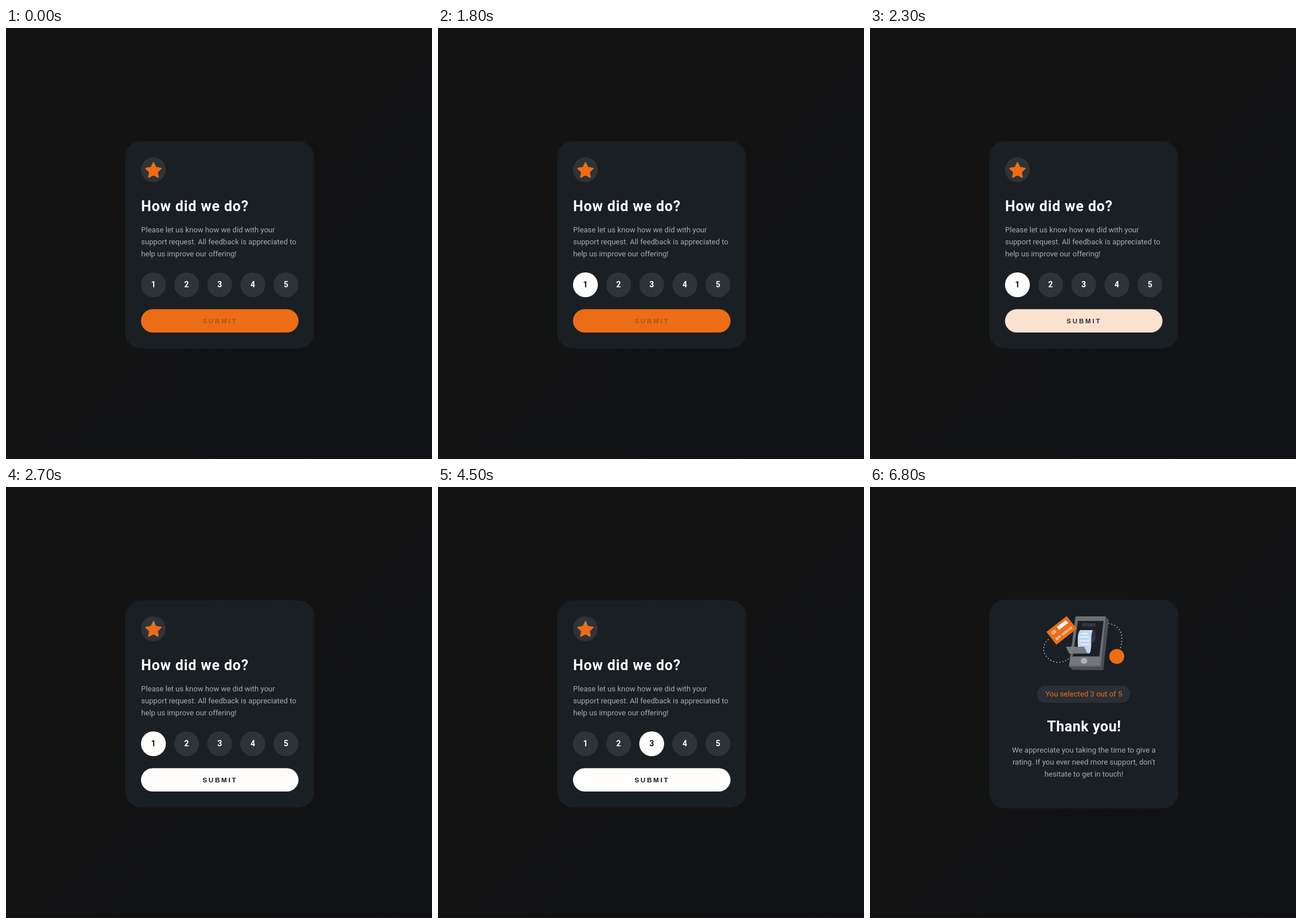
Recreate the animation shown at these times as an HTML page. Size 744 by 753 pixels, loop 9000 ms.

```html
<!DOCTYPE html>
<html lang="en">
<head>
<meta charset="utf-8">
<title>Rating card</title>
<style>
  html, body { margin: 0; height: 100%; overflow: hidden; background: #121315; }
  svg { display: block; width: 100vw; height: 100vh; }
  text { font: 13.1px Roboto, sans-serif; fill: #a8abae; }
  .title { font-size: 25px; font-weight: 700; fill: #fff; }
  .mid, .rate text { text-anchor: middle; }
  .mid { font-size: 13.2px; }
  .rate text { font-size: 14px; font-weight: 700; }
  #label { font: bold 11.7px "Liberation Sans", Arial, sans-serif; letter-spacing: 2.7px; fill: #111417; }
  .dots { fill: none; stroke: #c9cbcd; stroke-width: 1.2; stroke-dasharray: 2.2 3.2; }
</style>
</head>
<body>
<svg viewBox="0 0 744 753">
  <defs>
    <linearGradient id="bg" x2="1" y2="1">
      <stop offset=".35" stop-color="#131313"/>
      <stop offset="1" stop-color="#101216"/>
    </linearGradient>
  </defs>
  <rect width="744" height="753" fill="url(#bg)"/>

  <g id="form">
    <rect x="208" y="198" width="330.5" height="362" rx="28" fill="#1a1f24"/>
    <circle cx="257.5" cy="247.7" r="21.7" fill="#2e3338"/>
    <polygon id="star" fill="#ed6d17" stroke="#ed6d17" stroke-width="2.6" stroke-linejoin="round"/>
    <text class="title" x="236" y="320" letter-spacing=".85">How did we do?</text>
    <text x="236" y="357">Please let us know how we did with your</text>
    <text x="236" y="378">support request. All feedback is appreciated to</text>
    <text x="236" y="399">help us improve our offering!</text>
    <g id="rates"></g>
    <rect id="button" x="235.8" y="491.3" width="275" height="40.8" rx="20.4"/>
    <text id="label" x="343.3" y="515.9">SUBMIT</text>
  </g>

  <g id="thanks">
    <rect x="208" y="197" width="330.5" height="364.5" rx="28" fill="#1a1f25"/>
    <path class="dots" d="M416 238.5C432 240 440 251 440 265Q440 274 437 282"/>
    <path class="dots" d="M312 266C301 274 301 288 309 297C319 309 338 310 350 297"/>
    <!-- terminal -->
    <path fill="#4b4f55" d="M411 226L417 232L407.5 320L354 319.5L347.5 313.5Z"/>
    <path fill="#6c7076" d="M359 226H411.5L403 313.5H347.5Z"/>
    <path fill="#1c2026" d="M363 234H408L400.5 296H354Z"/>
    <path fill="#74777c" d="M350 296.5H402L400.5 311H348.5Z"/>
    <path fill="#34383e" d="M371 238H394.5L393.5 243.5H370Z"/>
    <path fill="#30343a" d="M386 250H391L394 255L393 271H384Z"/>
    <ellipse cx="373.7" cy="303.7" rx="5.7" ry="5" fill="#b0b2b5"/>
    <!-- receipt -->
    <path fill="#c2d7f1" d="M367 250H389C384 260 389 279 384 290Q379 292 361 290C366 280 359 259 367 250Z"/>
    <path stroke="#f5f8fc" stroke-width="1.3" d="M368 256H381M366 262H382M366 268.5H383M367 275H383"/>
    <path fill="#777a7f" d="M342 279H374L380 291H348Z"/>
    <!-- payment card -->
    <g transform="translate(334.5 250.5) rotate(-38)">
      <rect x="-22.5" y="-14.2" width="45" height="28.4" fill="#ed6d17"/>
      <rect x="-3" y="-9.7" width="20" height="6.5" fill="#fff"/>
      <g fill="#f3ab7b">
        <rect x="-17.5" y="-9" width="9.5" height="6.5" rx="3"/>
        <rect x="-18" y="4" width="11" height="5" rx="1.5"/>
        <rect x="-4.5" y="4.5" width="22.5" height="4.5" rx="1.5"/>
      </g>
    </g>
    <circle cx="431" cy="296" r="13" fill="#ed6d17"/>
    <rect x="292" y="347" width="162" height="30" rx="14" fill="#2a2f35"/>
    <text class="mid" x="373.3" y="365.5" style="fill:#ed6d17">You selected 3 out of 5</text>
    <text class="title" x="309.3" y="427.3" letter-spacing=".55">Thank you!</text>
    <text class="mid" x="373.5" y="464">We appreciate you taking the time to give a</text>
    <text class="mid" x="373.5" y="485">rating. If you ever need more support, don't</text>
    <text class="mid" x="373.5" y="506">hesitate to get in touch!</text>
  </g>
</svg>
<script>
const $ = id => document.getElementById(id);
const LOOP = 9000, STEP = 100;
const ORANGE = [237, 109, 23], WHITE = [255, 254, 252];
const rgb = c => `rgb(${c.map(Math.round)})`;

$('star').setAttribute('points', Array.from({ length: 10 }, (_, i) => {
  const r = i % 2 ? 6.6 : 13.6, a = i * Math.PI / 5;
  return [257.5 + r * Math.sin(a), 249.4 - r * Math.cos(a)].map(v => v.toFixed(2));
}).join(' '));

$('rates').innerHTML = [1, 2, 3, 4, 5].map(n => {
  const x = 257.5 + 57.85 * (n - 1);
  return `<g class="rate"><circle cx="${x}" cy="448.6" r="21.7"/><text x="${x}" y="452.8">${n}</text></g>`;
}).join('');
const rates = [...document.querySelectorAll('.rate')];

// cubic-bezier(.25, .1, .25, 1)
function ease(x) {
  if (x <= 0 || x >= 1) return x <= 0 ? 0 : 1;
  const curve = (a, b, s) => 3 * a * s * (1 - s) ** 2 + 3 * b * s * s * (1 - s) + s ** 3;
  let lo = 0, hi = 1;
  for (let i = 0; i < 20; i++) {
    const mid = (lo + hi) / 2;
    if (curve(.25, .25, mid) < x) lo = mid; else hi = mid;
  }
  return curve(.1, 1, lo);
}

function draw(now) {
  const t = Math.floor(now % LOOP / STEP) * STEP;
  const done = t >= 6400;
  $('form').style.display = done ? 'none' : '';
  $('thanks').style.display = done ? '' : 'none';

  const picked = t >= 3900 ? 3 : t >= 1800 ? 1 : 0;
  const hovered = t >= 3200 ? 3 : t >= 900 ? 1 : 0;
  rates.forEach((g, i) => {
    const n = i + 1, lit = n === picked || n === hovered;
    g.firstChild.style.fill = n === picked ? rgb(WHITE) : n === hovered ? rgb(ORANGE) : '#2e3338';
    g.lastChild.style.fill = lit ? '#14181b' : '#fff';
  });

  const k = ease((t - 1800) / 1000);
  $('button').style.fill = rgb(ORANGE.map((v, i) => v + (WHITE[i] - v) * k));
  $('label').style.fillOpacity = .3 + .7 * k;
}

const start = performance.now();
function tick() {
  draw(performance.now() - start);
  requestAnimationFrame(tick);
}
tick();
</script>
</body>
</html>
```
